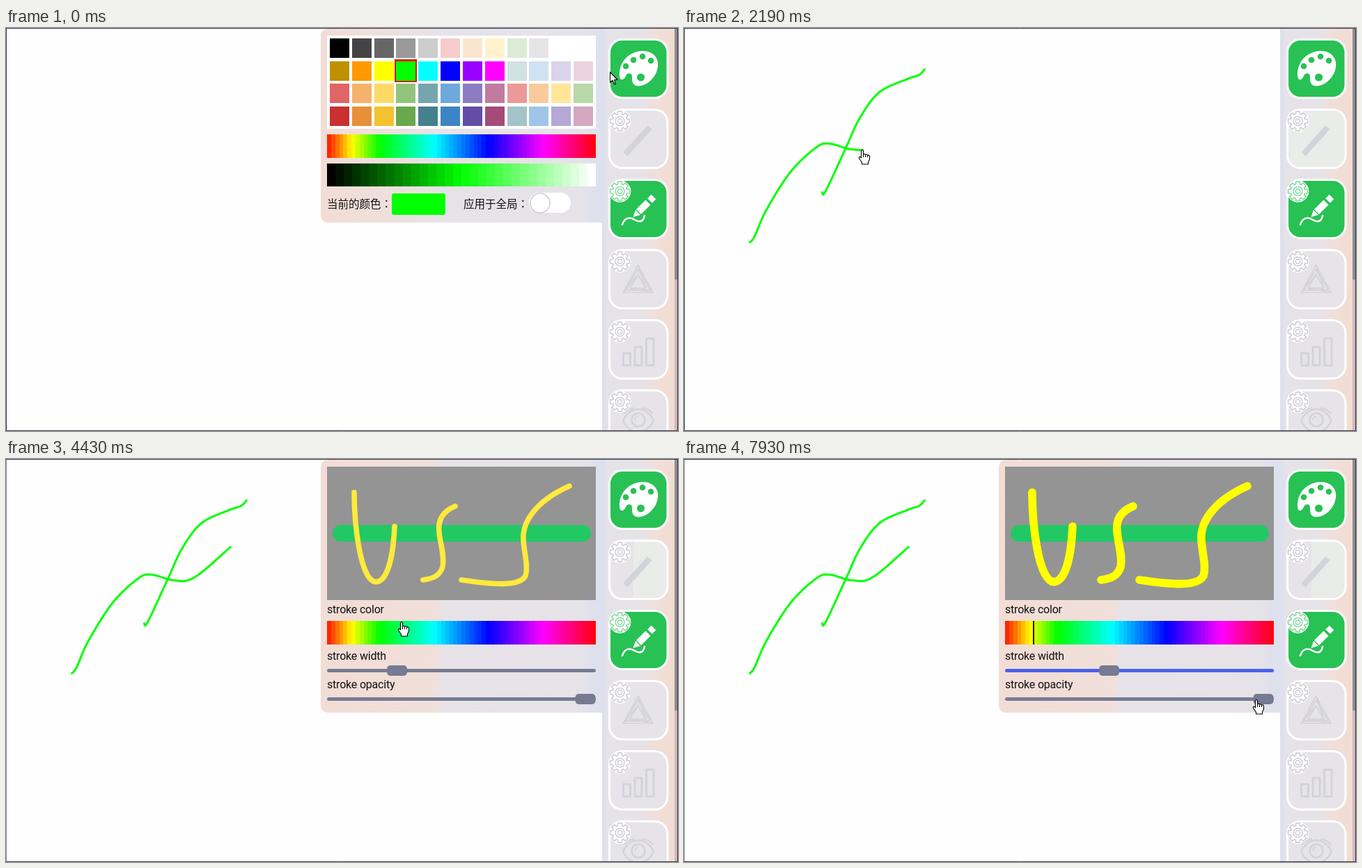
An HTML page with a canvas that plays this animation: 965 px wide and 580 px high, repeating every 8 s.

```html
<!DOCTYPE html>
<html lang="en">
<head>
<meta charset="utf-8">
<title>Drawing board</title>
<style>
html, body { margin: 0; width: 100%; height: 100%; overflow: hidden; background: #fefefe; }
canvas { display: block; }
</style>
</head>
<body>
<canvas id="stage" width="965" height="580"></canvas>
<script>
const ctx = document.getElementById('stage').getContext('2d');
const LOOP = 8000;
const CLOSE = 300, OPEN = 3600, PICK = 5060, REPICK = 5560, DRAG = 6860, DROP = 7200;
const GREY = '#e6e4e8', ICON = '#d3d3da', GREEN = '#28c154', SLATE = '#767b93';
const PEACH = '#f2ddd5', HAZE = '#e6e3e8', LILAC = '#dfe0ee';

// ---------- helpers ----------
const ramp = (t, a, b) => Math.max(0, Math.min(1, (t - a) / (b - a)));
const mix = (a, b, k) => a + (b - a) * k;

function rect(x, y, w, h, color) {
  ctx.fillStyle = color;
  ctx.fillRect(x, y, w, h);
}
function box(x, y, w, h, r, color) {
  ctx.beginPath();
  ctx.roundRect(x, y, w, h, r);
  ctx.fillStyle = color;
  ctx.fill();
}
function ring(x, y, r, color, width, fill) {
  ctx.beginPath();
  ctx.arc(x, y, r, 0, Math.PI * 2);
  if (fill) { ctx.fillStyle = fill; ctx.fill(); }
  ctx.strokeStyle = color;
  ctx.lineWidth = width;
  ctx.stroke();
}
function line(d, color, width, cap = 'butt') {
  ctx.strokeStyle = color;
  ctx.lineWidth = width;
  ctx.lineCap = cap;
  ctx.lineJoin = 'round';
  ctx.stroke(new Path2D(d));
}
function shape(d, color) {
  ctx.fillStyle = color;
  ctx.fill(new Path2D(d));
}
function text(s, x, y, size, spacing = 0) {
  ctx.font = `${size}px Roboto, "Noto Sans CJK JP", "Noto Sans CJK", sans-serif`;
  ctx.letterSpacing = spacing + 'px';
  ctx.fillStyle = '#111';
  ctx.fillText(s, x, y);
}
function blend(x0, x1, stops) {
  const g = ctx.createLinearGradient(x0, 0, x1, 0);
  for (const [x, c] of stops) g.addColorStop((x - x0) / (x1 - x0), c);
  return g;
}

// ---------- freehand strokes ----------
// Catmull-Rom spline through a few points
function curve(points) {
  const at = i => points[Math.max(0, Math.min(points.length - 1, i))];
  const out = [];
  for (let n = 0; n <= (points.length - 1) * 12; n++) {
    const i = Math.floor(n / 12), u = n / 12 - i;
    out.push([0, 1].map(k => {
      const [a, b, c, d] = [-1, 0, 1, 2].map(j => at(i + j)[k]);
      return b + 0.5 * u * (c - a + u * (2 * a - 5 * b + 4 * c - d + u * (3 * (b - c) + d - a)));
    }));
  }
  return out;
}
const strokes = [
  { from: 890, to: 1290, path: curve([[198, 236], [203, 234], [232, 172], [252, 129],
    [280, 92], [320, 73], [337, 67], [345, 59]]) },
  { from: 1770, to: 2280, path: curve([[94, 308], [101, 299], [118, 261], [153, 206],
    [190, 171], [209, 166], [240, 174], [270, 170], [322, 126]]) }
];
const head = (s, t) => Math.floor(ramp(t, s.from, s.to) * (s.path.length - 1));

function drawStroke(s, t) {
  if (t < s.from) return;
  ctx.beginPath();
  for (const [x, y] of s.path.slice(0, head(s, t) + 1)) ctx.lineTo(x + 0.5, y + 0.5);
  ctx.strokeStyle = '#0f0';
  ctx.lineWidth = 3;
  ctx.lineCap = ctx.lineJoin = 'round';
  ctx.stroke();
}

// ---------- pointer: time, x, y at each turn ----------
const route = [
  [0, 867, 63], [200, 878, 70], [860, 198, 236], [1320, 345, 54], [1480, 157, 162],
  [1740, 94, 307], [2280, 322, 126], [2480, 378, 298], [2890, 815, 269], [3240, 889, 300],
  [3560, 890, 233], [3670, 890, 233], [4140, 667, 189], [4430, 568, 234], [4610, 493, 243],
  [4860, 505, 245], [5220, 505, 245], [5380, 500, 246], [6000, 505, 247], [6680, 555, 300],
  [DRAG, 555, 300], [DROP, 604, 300], [7360, 604, 300], [7930, 822, 346], [LOOP + 1, 822, 346]
];
function pointer(t) {
  const s = strokes.find(s => t >= s.from && t < s.to);
  if (s) return s.path[head(s, t)];
  const i = route.findIndex(k => k[0] > t);
  const [a, x0, y0] = route[i - 1], [b, x1, y1] = route[i];
  const k = ramp(t, a, b);
  return [mix(x0, x1, k), mix(y0, y1, k)];
}
const ARROW = 'M0 0V15L3.5 11.7 6 17.5H8L6 11H10.5Z';
const HAND = 'M-1.5 1Q0-1 1.5 1V6.5Q3 5 4.5 6.7 6.3 5.3 7.5 7.7 9.9 6.7 10.5 9V13.5' +
  'L8.5 17.5V20.5H-.5V18L-4.5 12Q-5 9.3-3 9.8L-1.5 11.5Z';

function drawPointer(t) {
  const [x, y] = pointer(t), arrow = t < 120, d = arrow ? ARROW : HAND;
  ctx.save();
  ctx.translate(Math.round(x) + (arrow ? 0.5 : 0), Math.round(y) + 0.5);
  shape(d, '#fff');
  line(d, '#000', 1.1);
  if (!arrow) line('M1.5 6.5V10.5M4.5 6.7V10.5M7.5 7.7V10.5', '#000', 1);
  ctx.restore();
}

// ---------- sidebar ----------
function gear(cx, cy, color) {
  ring(cx, cy, 15.5, '#fff', 1, '#fff');
  ctx.beginPath();
  for (let i = 0; i < 32; i++) {
    const a = (Math.floor(i / 4) + [-0.38, -0.25, 0.25, 0.38][i % 4]) * Math.PI / 4;
    const r = i % 4 % 3 ? 14.2 : 10.5;
    ctx.lineTo(cx + r * Math.cos(a), cy + r * Math.sin(a));
  }
  ctx.closePath();
  ctx.lineJoin = 'round';
  ctx.strokeStyle = color;
  ctx.lineWidth = 1.7;
  ctx.stroke();
  ring(cx, cy, 6.5, color, 1.5);
  ring(cx, cy, 3.2, color, 1.4);
}

const icons = [
  function palette() {
    shape('M881 69C880 50 893 34 914 33 930 33 938 44 936 56 934 70 922 83 908 83.5 898 83 ' +
      '899 74 899 69 898 64 892 64 890 69 888 74 882 78 881 69Z', '#fff');
    line('M890 55h.1M901 46h.1M914 41h.1M926 47h.1', GREEN, 8.5, 'round');
    line('M911.5 71h.1', GREEN, 11, 'round');
  },
  function ruler() {
    line('M889.5 181.5L924.5 143', ICON, 8.5);
  },
  function pencil() {
    line('M908.5 264.5L922 251', '#fff', 10);
    line('M924.5 248.5L930 243', '#fff', 9.5);
    shape('M900.5 272L904 262 911 269Z', '#fff');
    line('M885 283C888 273 895 272 901 275 909 280 915 280 917 270', '#fff', 2.6, 'round');
  },
  function triangle() {
    line('M907.5 341L929 380.5H886.5ZL919 374.5M929 380.5L896 374.5M886.5 380.5L907.5 355', ICON, 1.6);
    line('M907.5 347L925 377H890ZM907.5 355L919 374.5H896Z', ICON, 1.8);
  },
  function chart() {
    line('M886.5 468H896.5V485.5H886.5ZM903 459H913V485.5H903ZM919.5 447H930V485.5H919.5Z', ICON, 3);
  },
  function eye() {
    line('M886 565C897 543 919 543 930 565 919 587 897 587 886 565Z', ICON, 2.6);
    line('M887 555Q895 547 902 547M914 547Q922 547 929 555M903 564A5 5 0 0 1 908 559', ICON, 2);
    ring(908, 564, 9.5, ICON, 2.6);
  }
];

function drawSidebar(t) {
  rect(856, 1, 109, 578, blend(856, 965, [[861, LILAC], [863, HAZE], [917, HAZE],
    [919, '#ede1e0'], [945, PEACH]]));
  icons.forEach((icon, i) => {
    const y = 15 + i * 101, on = i === 0 || i === 2;
    box(865, y, 86.5, 87, 20, '#fff');
    box(868, y + 3, 80.5, 81, 17, on ? GREEN : GREY);
    if (i === 1 && t >= CLOSE) {
      const left = t < OPEN ? 868 : 901;
      box(left, y + 3, 948.5 - left, 81, t < OPEN ? 17 : [0, 17, 17, 0], '#eaecea');
    }
    icon();
    if (i) gear(881.5, y + 18, on ? '#8ad9a2' : '#cfced6');
  });
  rect(960, 1, 4, 578, '#d3b9b8');
  rect(960, 1, 4, 361, '#918e90');
}

// ---------- panels ----------
function bar(y, h, count, color) {
  const edge = i => Math.round(461 + 386 * i / count);
  for (let i = 0; i < count; i++) rect(edge(i), y, edge(i + 1) - edge(i), h, color((i + 1) / (count + 1)));
}
// red to green takes a fifth of the bar, the rest runs evenly back to red
const hue = k => `hsl(${k < 0.2 ? 600 * k : 60 + 300 * k} 100% 50%)`;
const rainbow = y => bar(y, 34, 66, hue);

// each base tone gives pale, light, soft and dark swatches
const tones = ['cc0000', 'f07e08', 'ffc000', '4b9d26', '1b697a', '0f6ec5', '43259b', '992361'];
const tint = (white, shade = 1) => hex => `rgb(${hex.match(/../g)
  .map(c => Math.round(mix(parseInt(c, 16), 255, white) * shade))})`;
const warm = tones.slice(0, 4), cool = tones.slice(4);
const swatches = [
  ['#000', '#444', '#666', '#999', '#ccc', ...warm.map(tint(0.8)), GREY, '#fff', '#fff'],
  ['#bf9000', '#f90', '#ff0', '#0f0', '#0ff', '#00f', '#90f', '#f0f', ...cool.map(tint(0.8))],
  [...tones.map(tint(0.4)), ...warm.map(tint(0.6))],
  [...tones.map(tint(0.2, 0.95)), ...cool.map(tint(0.6))]
];

function panel(height, fadeFrom, fadeTo) {
  box(452, 1, 405, height, [10, 0, 0, 10], blend(452, 857, [[452, PEACH], [fadeFrom, '#f0dfda'],
    [fadeTo, '#e7e2e7'], [825, HAZE], [845, LILAC]]));
}

function drawPalette() {
  panel(279, 530, 620);
  rect(461, 11, 386, 134, '#fff');
  swatches.forEach((row, r) => row.forEach((color, i) => {
    const x = Math.round(465 + i * 31.82), y = Math.round(14.8 + r * 32.8);
    if (color === '#0f0') rect(x - 2, y - 3, 32, 33, '#e01212');
    rect(x, y, 28, 28, color);
  }));
  rainbow(153);
  bar(195, 33, 32, k => `hsl(120 100% ${mix(-3, 103, k)}%)`);
  text('当前的颜色：', 461, 258.5, 15.5);
  box(554, 238, 77, 31, 3, '#0f0');
  text('应用于全局：', 657, 258.5, 15.5);
  box(751, 237, 60, 29, 14.5, '#fff');
  ring(767, 252, 14, '#cfcdd3', 1.5, '#fff');
}

function setting(label, y, x, track) {
  text('stroke ' + label, 461, y - 15.5, 16, -0.2);
  box(461, y - 2.5, 386, 5, 2.5, track);
  box(x - 14.5, y - 7.5, 29, 15, 5, SLATE);
}

function drawBrush(t) {
  const drag = ramp(t, DRAG, DROP);
  const ink = t < PICK ? '#ffea3c' : t < REPICK ? '#eaff00' : '#ff0';
  panel(364, 621, 623);
  rect(461, 11, 386, 192, '#949494');
  line('M481 107H828', '#22c864', 24, 'round');
  line('M500 48C500 90 508 175 531 177 548 176 556 140 558 97' +
    'M645 68C625 76 620 90 622 106 624 124 630 140 627 155 623 168 614 172 599 174' +
    'M809 39C770 56 740 85 743 118 745 140 750 155 746 168 738 184 700 181 654 174',
    ink, mix(7.6, 11.6, drag), 'round');
  text('stroke color', 461, 221.5, 16, -0.2);
  rainbow(233);
  if (t >= PICK) rect(t < REPICK ? 506 : 501, 233, 2, 34, '#1a1a1a');
  setting('width', 304.5, mix(561.5, 610.5, drag), t < DRAG ? SLATE : '#4a62ea');
  setting('opacity', 345.5, 832, SLATE);
}

// ---------- scene ----------
function draw(t) {
  rect(0, 0, 965, 580, '#fefefe');
  strokes.forEach(s => drawStroke(s, t));
  drawSidebar(t);
  if (t < CLOSE) drawPalette();
  if (t >= OPEN) drawBrush(t);
  drawPointer(t);
  ctx.strokeStyle = '#33344e';
  ctx.lineWidth = 1;
  ctx.strokeRect(0.5, 0.5, 964, 579);
}

const start = performance.now();
function tick() {
  draw((performance.now() - start) % LOOP);
  requestAnimationFrame(tick);
}
tick();
</script>
</body>
</html>
```
